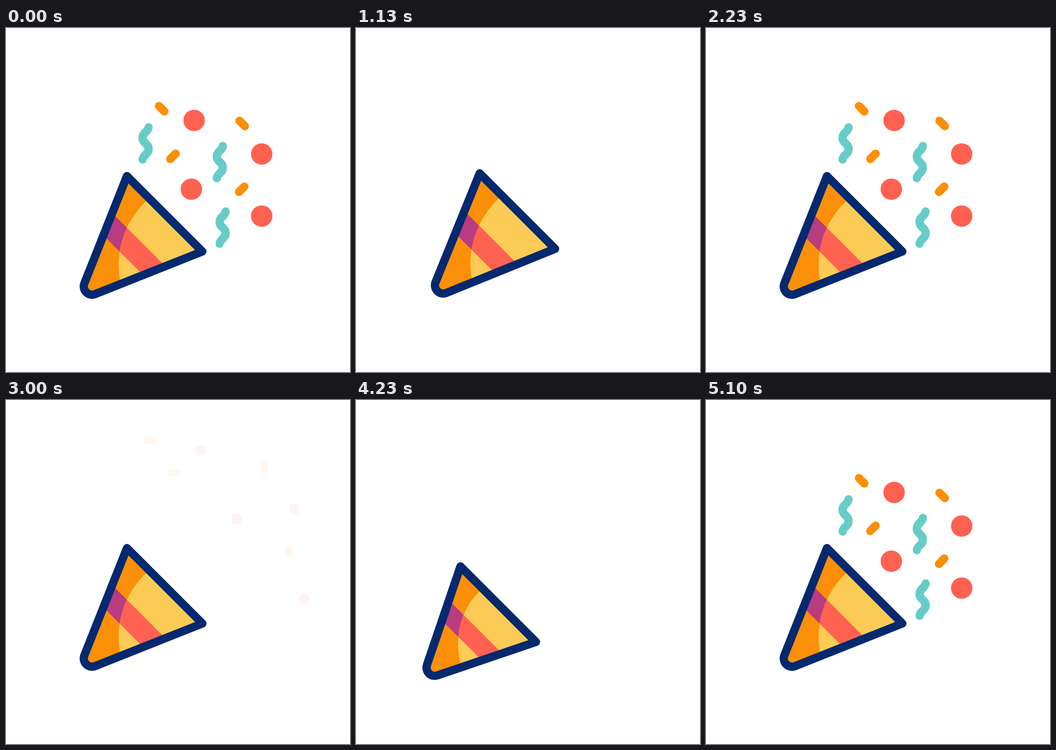
An HTML page with a canvas for the animation above (5.13 s loop, 748 by 748 pixels).

```html
<!DOCTYPE html>
<html lang="en">
<head>
<meta charset="utf-8">
<title>Party popper</title>
<style>
  html, body { margin: 0; width: 100%; height: 100%; overflow: hidden; background: #fff; }
  canvas { display: block; width: 100vw; height: 100vh; object-fit: contain; }
</style>
</head>
<body>
<canvas id="stage" width="748" height="748"></canvas>
<script>
const ctx = document.getElementById('stage').getContext('2d');
const SIZE = 748, LOOP = 5130, CYCLE = 77;
const NAVY = '#04296f', ORANGE = '#fc8f08', YELLOW = '#fbcb56';
const CORAL = '#ff6151', PURPLE = '#b83c7f', TEAL = '#66ccca';

const lerp = (a, b, u) => a + (b - a) * u;
const ramp = (v, a, b) => Math.max(0, Math.min(1, (v - a) / (b - a)));
const ease = (v, a, b) => {
  const u = ramp(v, a, b);
  return u * u * (3 - 2 * u);
};

// The cone dips, swings up, crouches, pops and settles
function poseAt(tick) {
  const dip = ease(tick, 15, 21), rise = ease(tick, 24.75, 38.75);
  const crouch = ease(tick, 42, 48.6), pop = ease(tick, 48.6, 52);
  const settle = ease(tick, 52, 57);
  const slide = -45 * dip + 69.5 * rise - 84.5 * crouch + 60 * pop;
  const sag = Math.max(0, -slide) * 0.055;
  return {
    dx: slide + sag,
    dy: sag - slide,
    along: 1 - 0.038 * dip + 0.08 * rise - 0.222 * crouch + 0.155 * pop + 0.025 * settle,
    across: 1 - 0.03 * crouch + 0.085 * pop - 0.055 * settle
  };
}

function drawCone(tick) {
  const { dx, dy, along, across } = poseAt(tick);
  const s = (along + across) / 2, k = (across - along) / 2;
  const map = (x, y) => [s * x + k * y, k * x + s * y];
  const top = map(-82, -82), right = map(82, 82), tip = map(-190, 190);

  ctx.save();
  ctx.translate(345 + dx, 404 + dy);
  const outline = new Path2D();
  outline.moveTo(...top);
  outline.lineTo(...right);
  outline.arcTo(...tip, ...top, 18);
  outline.closePath();

  ctx.save();
  ctx.clip(outline);
  ctx.transform(s, k, k, s, 0, 0);
  const light = new Path2D();
  light.arc(91, 111, 191, 0, Math.PI * 2);
  const stripe = new Path2D();
  stripe.moveTo(-300, -187.5);
  stripe.lineTo(200, 312.5);
  stripe.lineTo(200, 380);
  stripe.lineTo(-300, -120);
  const paint = (base, band) => {
    ctx.fillStyle = base;
    ctx.fillRect(-300, -300, 600, 600);
    ctx.fillStyle = band;
    ctx.fill(stripe);
  };
  paint(ORANGE, PURPLE);
  ctx.clip(light);
  paint(YELLOW, CORAL);
  ctx.restore();

  ctx.strokeStyle = NAVY;
  ctx.lineWidth = 18;
  ctx.lineJoin = 'round';
  ctx.stroke(outline);
  ctx.restore();
}

const SHAPES = {
  dot() {
    ctx.fillStyle = CORAL;
    ctx.arc(0, 0, 23.3, 0, Math.PI * 2);
    ctx.fill();
  },
  pill() {
    ctx.strokeStyle = ORANGE;
    ctx.moveTo(-8.3, 0);
    ctx.lineTo(8.3, 0);
    ctx.stroke();
  },
  curl() {
    ctx.strokeStyle = TEAL;
    ctx.moveTo(6.5, -35);
    ctx.bezierCurveTo(5, -24, -6.5, -24, -6.5, -12);
    ctx.bezierCurveTo(-6.5, 0, 6.5, 0, 6.5, 12);
    ctx.bezierCurveTo(6.5, 24, -5, 24, -6.5, 35);
    ctx.stroke();
  }
};

// Resting places of the confetti
const PLACES = {
  dot: [[409, 201], [556, 274], [403, 350.5], [556, 409]],
  pill: [[338.5, 175.5], [513.5, 207.5], [363, 279], [512.5, 350.5]],
  curl: [[303.5, 251], [465, 291.5], [471, 434]]
};
const MOUTH = { x: 320, y: 430 };

// Pieces fan out from the diagonal; the nearest fly farthest
function driftFrom(x, y) {
  const dx = x - MOUTH.x, dy = y - MOUTH.y;
  const angle = lerp(-Math.PI / 4, Math.atan2(dy, dx), 1.5);
  const reach = 175 - 0.33 * Math.hypot(dx, dy);
  return [Math.cos(angle) * reach, Math.sin(angle) * reach];
}

function drawPiece(kind, x, y, grow, away, alpha) {
  const [dx, dy] = driftFrom(x, y);
  const size = grow * lerp(1, kind === 'pill' ? 0.8 : 0.5, away);
  ctx.save();
  ctx.globalAlpha = alpha;
  ctx.translate(lerp(MOUTH.x, x, grow) + dx * away, lerp(MOUTH.y, y, grow) + dy * away);
  ctx.scale(size, size);
  if (kind === 'pill') {
    const tilt = y < 250 ? 1 : -1;
    ctx.rotate(tilt * Math.PI / 4 * lerp(1, x < 400 ? 0 : 2, away));
  }
  ctx.lineWidth = 18;
  ctx.lineCap = 'round';
  ctx.beginPath();
  SHAPES[kind]();
  ctx.restore();
}

function drawConfetti(tick) {
  const bursting = tick > 52;
  if (!bursting && tick >= 14) return;
  const grow = bursting ? 1 - Math.pow(1 - ramp(tick, 52, 68), 3) : 1;
  const away = bursting ? 0 : ease(tick, 0, 14);
  for (const kind in PLACES) {
    const alpha = bursting ? 1 : 1 - ramp(tick, 5, kind === 'curl' ? 13 : 13.6);
    for (const [x, y] of PLACES[kind]) drawPiece(kind, x, y, grow, away, alpha);
  }
}

function draw(now) {
  const tick = Math.floor((now % LOOP + 4) * 0.03) % CYCLE;
  ctx.fillStyle = '#fff';
  ctx.fillRect(0, 0, SIZE, SIZE);
  drawConfetti(tick);
  drawCone(tick);
}

let start = null;
function loop(now) {
  if (start === null) start = now;
  draw(now - start);
  requestAnimationFrame(loop);
}
draw(0);
requestAnimationFrame(loop);
</script>
</body>
</html>
```
